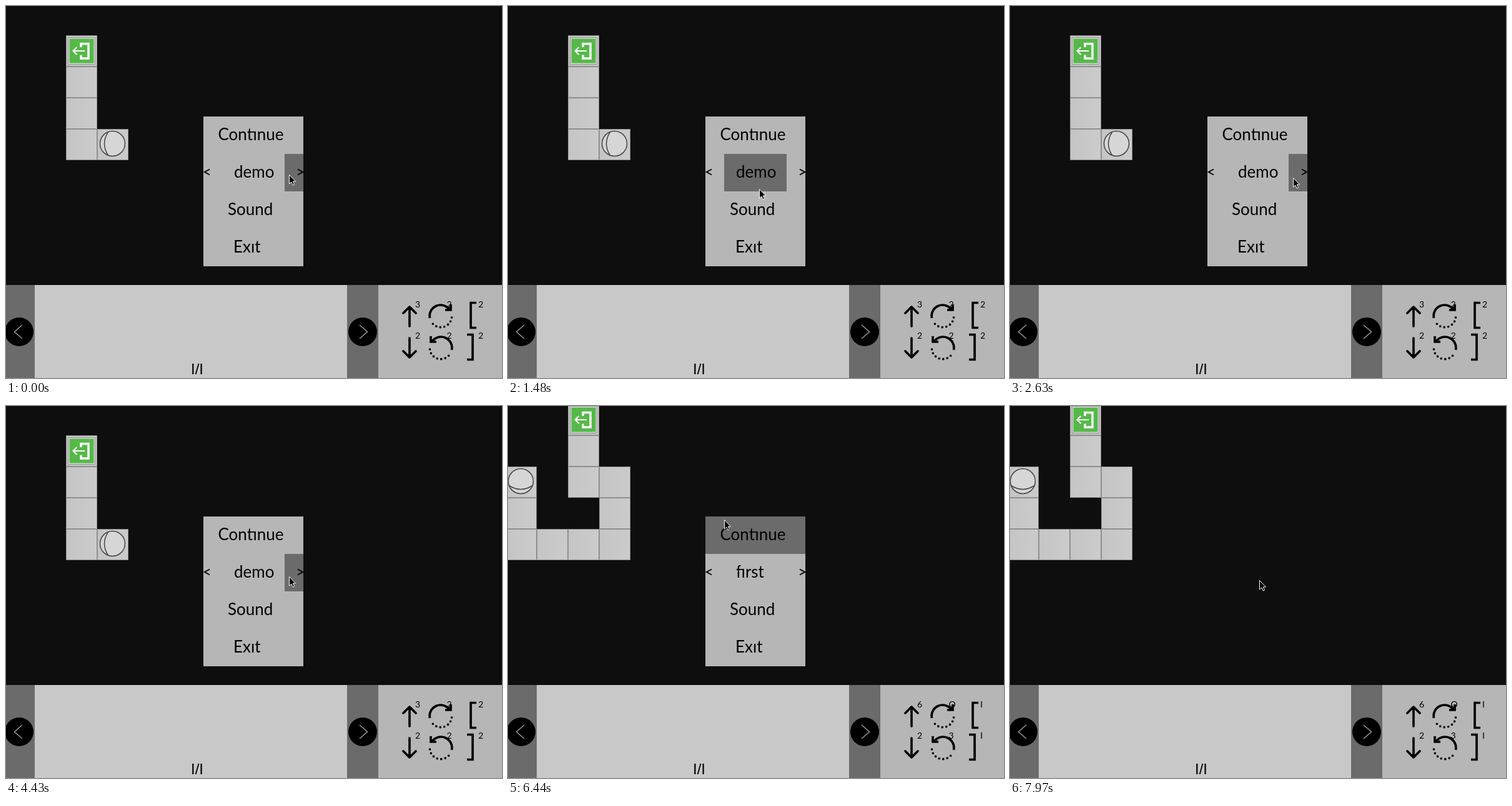
An HTML page that plays this animation: 794x596 px, repeating every 8 s.

```html
<!DOCTYPE html>
<html lang="en">
<head>
<meta charset="utf-8">
<title>Puzzle menu</title>
<style>
html, body { margin: 0; width: 100%; height: 100%; overflow: hidden; background: #0e0e0e; }
svg { display: block; }
text { font: 26px Lato, sans-serif; }
.count text { font-size: 14px; }
.page { font: 24px "Liberation Sans", sans-serif; }
.line { fill: none; stroke: #000; stroke-width: 2; }
.icon { stroke-width: 3.7; }
.round { stroke-linecap: round; stroke-linejoin: round; }
</style>
</head>
<body>
<svg width="794" height="596" viewBox="0 0 794 596">
  <defs>
    <linearGradient id="metal">
      <stop offset="0" stop-color="#c5c5c5"/>
      <stop offset="1" stop-color="#cbcbcb"/>
    </linearGradient>
    <rect id="tile" x=".5" y=".5" width="49" height="49" fill="url(#metal)" stroke="#8f8f8f"/>
    <g id="exit">
      <use href="#tile"/>
      <rect x="3.5" y="3.5" width="43" height="43" fill="#d8d8d8" stroke="#8f8f8f"/>
      <rect x="5.5" y="5.5" width="39" height="39" fill="#55b948"/>
      <g fill="none" stroke="#fff">
        <path d="M24 19V13.5H36V37H24V31.5" stroke-width="3.5"/>
        <path d="M30 25H11.5M17.5 19L11.5 25L17.5 31" stroke-width="2.2"/>
      </g>
    </g>
    <g id="ball" stroke="#444" stroke-width="1.5">
      <circle r="20" fill="#d6d6d6"/>
      <path d="M-7 -18.7Q-19 0 -7 18.7" fill="none"/>
    </g>
    <g id="button">
      <circle r="23"/>
      <path d="M5 -11L-7.5 0L5 11" fill="none" stroke="#999" stroke-width="1.5"/>
    </g>
    <path id="arrow" class="line icon round" d="M0 16V-15M-10 -5L0 -15L10 -5"/>
    <g id="turn" class="line icon">
      <path d="M-17.500 3A17.500 17.500 0 0 1 14 -10.500M16 -19V-10H7"/>
      <path class="round" d="M17.500 2A17.500 17.500 0 0 1 -15 9" stroke-dasharray="0 6.6"/>
    </g>
    <path id="bracket" class="line icon" d="M5 -20H-4V20H5"/>
  </defs>

  <g id="levels"></g>

  <path d="M0 447H46V596H0ZM546 447H596V596H546Z" fill="#6b6b6b"/>
  <path d="M46 447H546V596H46Z" fill="#c8c8c8"/>
  <path d="M596 447H794V596H596Z" fill="#b6b6b6"/>
  <use href="#button" x="21" y="522"/>
  <use href="#button" transform="translate(571 522) scale(-1 1)"/>
  <text class="page" x="296" y="590">I/I</text>

  <use href="#arrow" x="646" y="497"/>
  <use href="#arrow" transform="translate(646 548) scale(1 -1)"/>
  <use href="#turn" x="696" y="497"/>
  <use href="#turn" transform="translate(696 548) scale(-1 1)"/>
  <use href="#bracket" x="748" y="495.500"/>
  <use href="#bracket" transform="translate(743 546.500) scale(-1 1)"/>
  <g id="counts"></g>

  <g id="menu">
    <rect x="316" y="177" width="160" height="240" fill="#b6b6b6"/>
    <rect id="hover" height="60" fill="#6b6b6b"/>
    <text x="339.500" y="214.500">Contınue</text>
    <text id="level" x="365" y="274.500"></text>
    <text x="355" y="334.500">Sound</text>
    <text x="364" y="394.500">Exıt</text>
    <path class="line" d="M326 261.500L318 266L326 270.500M467 261.500L475 266L467 270.500"/>
  </g>
  <path id="cursor" d="M0 0V14.500L3.300 11.500L5.600 16.500L8 15.500L5.800 10.500H10Z" stroke="#fff"/>
</svg>

<script>
const $ = id => document.getElementById(id);
const show = (el, on) => el.setAttribute('display', on ? 'inline' : 'none');

// Each level walks from its exit down to the ball.
const levels = [
  { top: 47, walk: 'DDDR', turn: 0, counts: '322222' },
  { top: -3, walk: 'DDRDDLLLUU', turn: -90, counts: '6OI23I' }
];

function buildLevel({ top, walk, turn, counts }) {
  let x = 96, y = top;
  let tiles = `<use href="#exit" x="${x}" y="${y}"/>`;
  for (const way of walk) {
    x += 50 * ((way === 'R') - (way === 'L'));
    y += 50 * ((way === 'D') - (way === 'U'));
    tiles += `<use href="#tile" x="${x}" y="${y}"/>`;
  }
  const place = `translate(${x + 24.5} ${y + 23.5}) rotate(${turn})`;
  $('levels').innerHTML += `<g>${tiles}<use href="#ball" transform="${place}"/></g>`;
  const digits = [...counts].map((d, i) =>
    `<text x="${655 + i % 3 * 50.5}" y="${i < 3 ? 483 : 533}">${d}</text>`);
  $('counts').innerHTML += `<g class="count">${digits.join('')}</g>`;
}
levels.forEach(buildLevel);

// Cursor moves: start and end time, point to bend towards, point to reach.
const STEP = 50;
const home = [453, 270];
const moves = [
  [340, 590, [330, 262], [177, 189]],
  [840, 1090, [300, 225], [422, 236]],
  [1270, 1930, [390, 370], [345, 255]],
  [1980, 2030, [350, 256], [356, 257]],
  [2080, 2630, [400, 262], [453, 275]],
  [4430, 5220, [445, 178], [385, 261]],
  [5750, 6440, [108, 95], [346, 182]],
  [7060, 7820, [150, 150], [40, 122]],
  [7870, 7970, [200, 180], [399, 279]]
];

function cursorAt(t) {
  let from = home;
  for (const [start, end, bend, to] of moves) {
    if (t < start) break;
    const steps = Math.round((end - start) / STEP) + 1;
    const p = Math.min(1, (Math.floor((t - start) / (end - start) * (steps - 1) + 0.001) + 1) / steps);
    const u = p * p * (3 - 2 * p), v = 1 - u;
    from = from.map((a, k) => v * v * a + 2 * u * v * bend[k] + u * u * to[k]);
  }
  return from.map(Math.round);
}

function setHover(x, y) {
  const inside = x >= 316 && x < 476 && y >= 177 && y < 417;
  show($('hover'), inside);
  if (!inside) return;
  const row = Math.floor((y - 177) / 60);
  let left = 316, right = 476;
  if (row === 1) [left, right] = x < 346 ? [316, 346] : x < 446 ? [346, 446] : [446, 476];
  $('hover').setAttribute('x', left);
  $('hover').setAttribute('y', 177 + row * 60);
  $('hover').setAttribute('width', right - left);
}

function draw(now) {
  const t = now % 8000;
  const current = t < 5360 ? 0 : 1;
  for (const id of ['levels', 'counts'])
    [...$(id).children].forEach((group, i) => show(group, i === current));
  const [x, y] = cursorAt(t);
  show($('menu'), t < 6730);
  setHover(x, y);
  $('level').textContent = t < 4630 ? 'demo' : 'fırst';
  $('cursor').setAttribute('transform', `translate(${x + 0.5} ${y + 0.5})`);
  requestAnimationFrame(draw);
}
requestAnimationFrame(draw);
</script>
</body>
</html>
```
